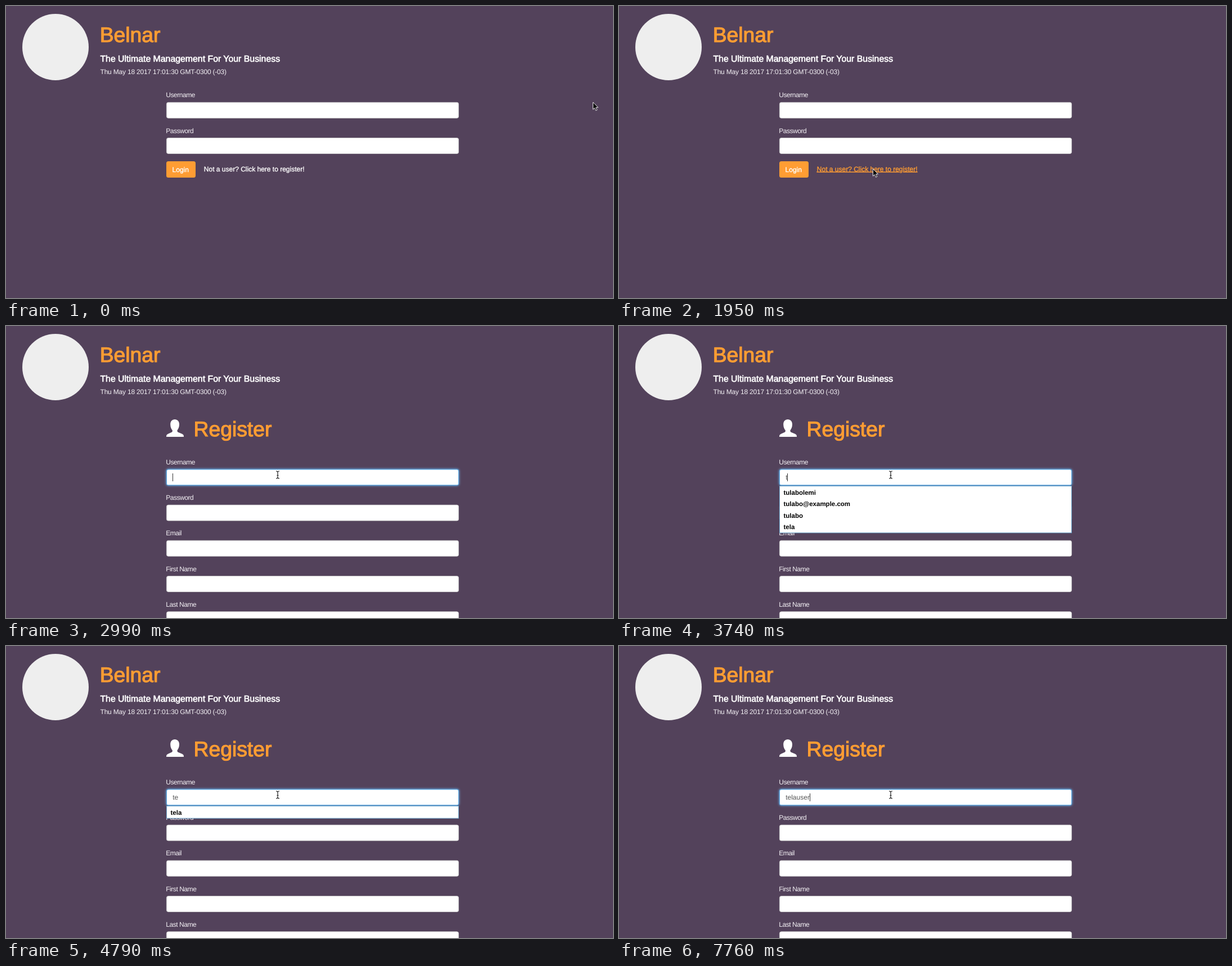
An HTML page for the animation above (8000 ms loop, 1079 by 519 pixels).

```html
<!DOCTYPE html>
<html lang="en">
<head>
<meta charset="utf-8">
<title>Register form</title>
<style>
  html, body { margin: 0; width: 100%; height: 100%; overflow: hidden; background: #53425b; }
  svg { display: block; width: 1079px; height: 519px; }
  text { font: 12px "Liberation Sans", Arial, sans-serif; text-rendering: geometricPrecision; white-space: pre; }
  .medium { fill: #fff; stroke: #fff; stroke-width: .35px; }
  .title { font-size: 37.3px; fill: #ff9d33; stroke: #ff9d33; stroke-width: 1.1px; }
  .subtitle { font-size: 15.85px; stroke-width: .65px; }
  .label { fill: #f4f1f5; letter-spacing: -.45px; }
  .date { letter-spacing: -.2px; }
  .field { fill: #fff; stroke: #ccc; stroke-width: .8px; }
  .focused { stroke: #5ba6e0; stroke-width: 1.2px; filter: drop-shadow(0 0 2px #66afe9); }
  .link.hover { fill: #ff9d33; stroke: #ff9d33; text-decoration: underline; }
  .typed { fill: #555; }
  .option { font-weight: bold; font-size: 11.5px; }
</style>
</head>
<body>
<svg viewBox="0 0 1079 519">
  <circle cx="88" cy="73" r="59" fill="#eee"/>
  <text class="title" x="166.7" y="64.3">Belnar</text>
  <text class="medium subtitle" x="167.4" y="99">The Ultimate Management For Your Business</text>
  <text class="label date" x="167.5" y="121.3">Thu May 18 2017 17:01:30 GMT-0300 (-03)</text>

  <g id="login">
    <rect x="285" y="276" width="52" height="29" rx="3.5" fill="#ff9d33"/>
    <text class="medium" x="295.6" y="294.5">Login</text>
    <text class="medium link" id="link" x="351.8" y="293.6">Not a user? Click here to register!</text>
  </g>

  <g id="register">
    <path fill="#fff" d="M300 166C305 166 308 169.500 308 175C308 180 306 183 304.500 185.200C304 187.500 305 188.500 307 189.300L313 191.800C315.500 193 316 194.500 316 197H285C285 194.500 285.500 193 288 191.800L293.500 189.300C295.500 188.500 296.300 187.500 295.700 185.200C294 183 292.200 180 292.200 175C292.200 169.500 295 166 300 166Z"/>
    <text class="title" x="333.5" y="195.600">Register</text>
  </g>

  <text class="typed" id="typed" x="296.2" y="273"></text>
  <path id="caret" d="M0 262V276" stroke="#333"/>
  <g id="menu">
    <rect id="menuBox" x="285.5" y="284.5" width="519" fill="#fff" stroke="#6ba5cc"/>
    <g id="options"></g>
  </g>
  <path id="arrow" d="M0 0V12.800L2.900 10.100L5 14.800L7.200 13.800L5.100 9.300H9Z" fill="#000" stroke="#fff" stroke-width=".9"/>
  <path id="beam" d="M-3 -6Q0 -6 0 -4Q0 -6 3 -6M0 -4V5M-3 7Q0 7 0 5Q0 7 3 7M-1.500 1.500H1.500" fill="none" stroke="#222" stroke-width="1.200"/>
</svg>
<script>
const LOOP = 8000;
const el = id => document.getElementById(id);

function add(parent, tag, attrs, content = "") {
  const node = document.createElementNS("http://www.w3.org/2000/svg", tag);
  for (const key in attrs) node.setAttribute(key, attrs[key]);
  node.textContent = content;
  return parent.appendChild(node);
}

function addFields(parent, top, labels) {
  return labels.map((label, i) => {
    const y = top + i * 63.2;
    add(parent, "text", { class: "label", x: 284.2, y: y - 9 }, label);
    return add(parent, "rect", { class: "field", x: 285.4, y, width: 519.2, height: 28, rx: 3.2 });
  });
}

addFields(el("login"), 171.3, ["Username", "Password"]);
const [nameField] = addFields(el("register"), 254.9, ["Username", "Password", "Email", "First Name", "Last Name"]);

const users = ["tulabolemi", "tulabo@example.com", "tulabo", "tela"];

// Pointer steps: time, x, y
const pointer = [
  [0, 1043.5, 171], [150, 790, 201], [330, 546, 230],
  [620, 531, 241], [760, 505, 257], [910, 478, 275], [1060, 456, 288], [1210, 448.5, 291], [1660, 451.5, 289.5],
  [2390, 456, 284], [2540, 470, 273], [2690, 479, 267], [2840, 483, 264]
];

// Field steps: time, typed text, caret shown
const typing = [
  [0, "", 0], [2990, "", 1], [3290, "", 0], [3740, "t", 1], [3890, "te", 1],
  [4190, "tea", 1], [4640, "te", 1], [4790, "te", 0], [4930, "tel", 1], [5080, "tela", 1],
  [5530, "tela", 0], [6130, "tela", 1], [6570, "tela", 0], [7020, "tela", 1],
  [7310, "telau", 1], [7460, "telaus", 1], [7610, "telause", 1], [7760, "telauser", 1]
];

const current = (steps, t) => steps.filter(step => step[0] <= t).pop();
const show = (node, on) => node.style.display = on ? "" : "none";

function drawMenu(text, t) {
  const reopening = t >= 4640 && t < 4790;
  const matches = text && !reopening ? users.filter(user => user.startsWith(text)) : [];
  show(el("menu"), matches.length);
  el("menuBox").setAttribute("height", 1.2 + matches.length * 20.5);
  el("options").replaceChildren();
  matches.forEach((user, i) =>
    add(el("options"), "text", { class: "option", x: 292.5, y: 300 + i * 20.4 }, user));
}

function draw(t) {
  const registering = t >= 2090;
  const [, x, y] = current(pointer, t);
  const [, text, caretOn] = current(typing, t);

  show(el("login"), !registering);
  show(el("register"), registering);
  el("link").classList.toggle("hover", y > 283 && x < 530);
  nameField.classList.toggle("focused", t >= 2990);

  el("typed").textContent = text;
  const caretX = 296.5 + (text ? Math.round(el("typed").getComputedTextLength()) : 0);
  el("caret").setAttribute("transform", `translate(${caretX})`);
  show(el("caret"), caretOn);
  drawMenu(text, t);

  const overField = registering && y < 283;
  show(el("arrow"), !overField);
  show(el("beam"), overField);
  el(overField ? "beam" : "arrow").setAttribute("transform", `translate(${x} ${y})`);
}

function tick() {
  draw(performance.now() % LOOP);
  requestAnimationFrame(tick);
}
tick();
</script>
</body>
</html>
```
